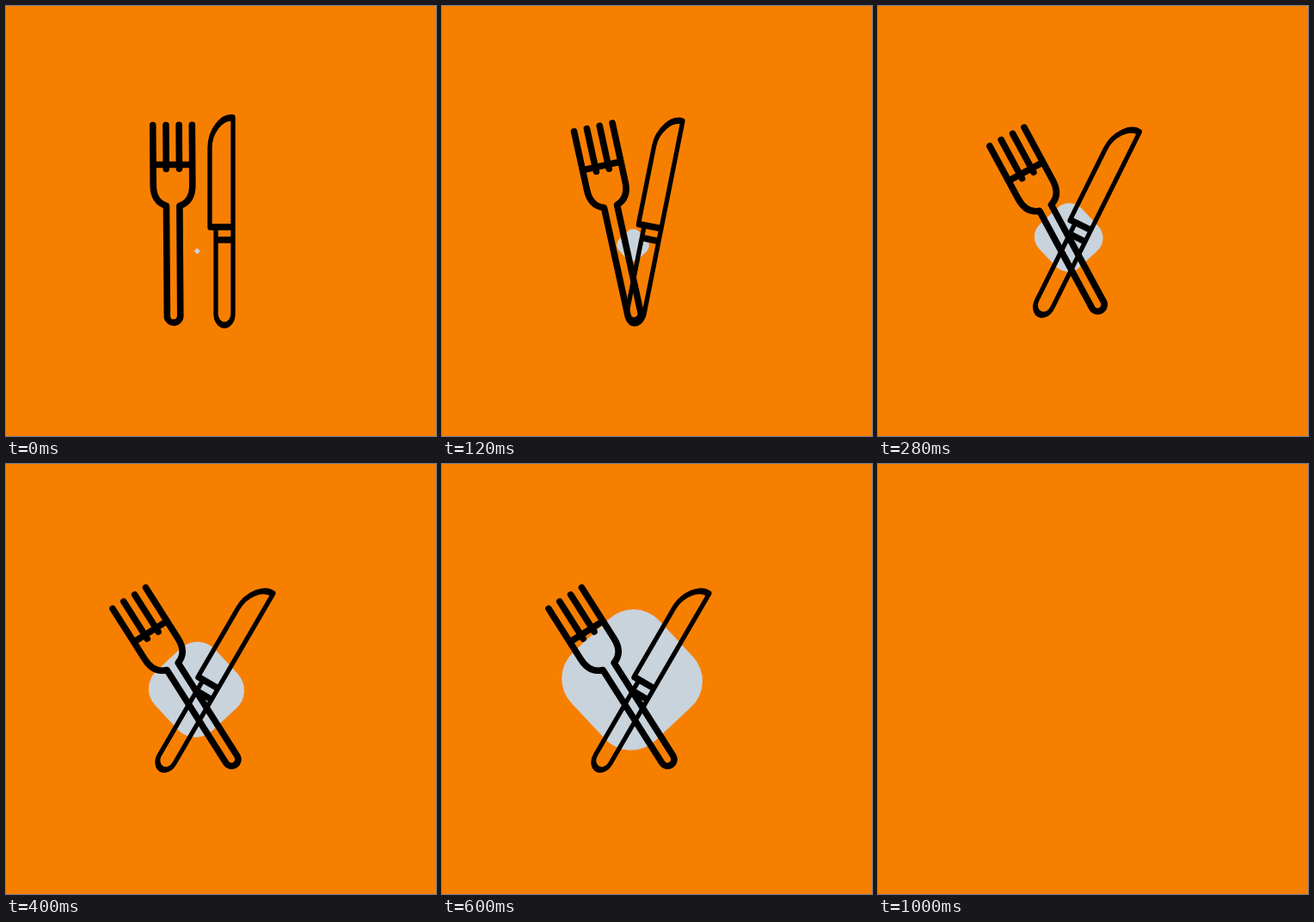
An HTML page that plays this animation: 500x500 px, repeating every 1.04 s.

```html
<!DOCTYPE html>
<html lang="en">
<head>
<meta charset="utf-8">
<title>Fork and knife</title>
<style>
  html, body { margin: 0; height: 100%; overflow: hidden; background: #f77f00; }
  svg { display: block; width: 100%; height: 100%; }
  .line { fill: none; stroke: #000; stroke-width: 7.6; stroke-linecap: round; stroke-linejoin: round; }
</style>
</head>
<body>
<svg viewBox="0 0 500 500">
  <g id="scene">
    <g id="plate">
      <rect x="-88" y="-88" width="176" height="176" rx="52" fill="#c9d3dc" transform="rotate(47)"/>
    </g>
    <g id="fork" class="line">
      <path d="M-22.8-113V-43C-22.8-30-17-22-7.7-19V109A7.7 7.7 0 0 0 7.7 109V-19C17-22 22.8-30 22.8-43V-113
               M-7.6-113V-62M7.6-113V-62M-22.8-67H22.8"/>
    </g>
    <g id="knife" class="line">
      <!-- squeezed sideways, so upright lines come out thinner -->
      <path transform="scale(.7 1)"
            d="M14.3 8V-119C-5-121-24.3-103-24.3-84V8H14.3V109A14.3 13 0 0 1-14.3 109V8M-14.3 23H14.3"/>
    </g>
  </g>
</svg>
<script>
const LOOP = 1040, STEP = 40, BLANK_AT = 1000, CROSS_TIME = 320, GROW_TIME = 760;
const [scene, plate, fork, knife] =
  ["scene", "plate", "fork", "knife"].map(id => document.getElementById(id));

const place = (part, x, y, rest) =>
  part.setAttribute("transform", `translate(${x} ${y}) ${rest}`);

function draw(now) {
  const t = Math.floor(now % LOOP / STEP) * STEP;
  scene.style.display = t < BLANK_AT ? "" : "none";

  const turn = Math.min(t / CROSS_TIME, 1);
  const slide = 1 - (1 - turn) ** 2;
  place(fork, 194.3 + 9.5 * slide, 251.4, `rotate(${-0.4 - 32 * turn})`);
  place(knife, 254 - 12 * slide, 249, `rotate(${30.2 * turn})`);

  const grow = Math.min(t / GROW_TIME, 1);
  place(plate, 222.3 - 1.6 * grow, 285 - 43.2 * grow, `scale(${0.03 + 0.97 * grow})`);
}

const start = performance.now();
function tick() {
  draw(performance.now() - start);
  requestAnimationFrame(tick);
}
tick();
</script>
</body>
</html>
```
